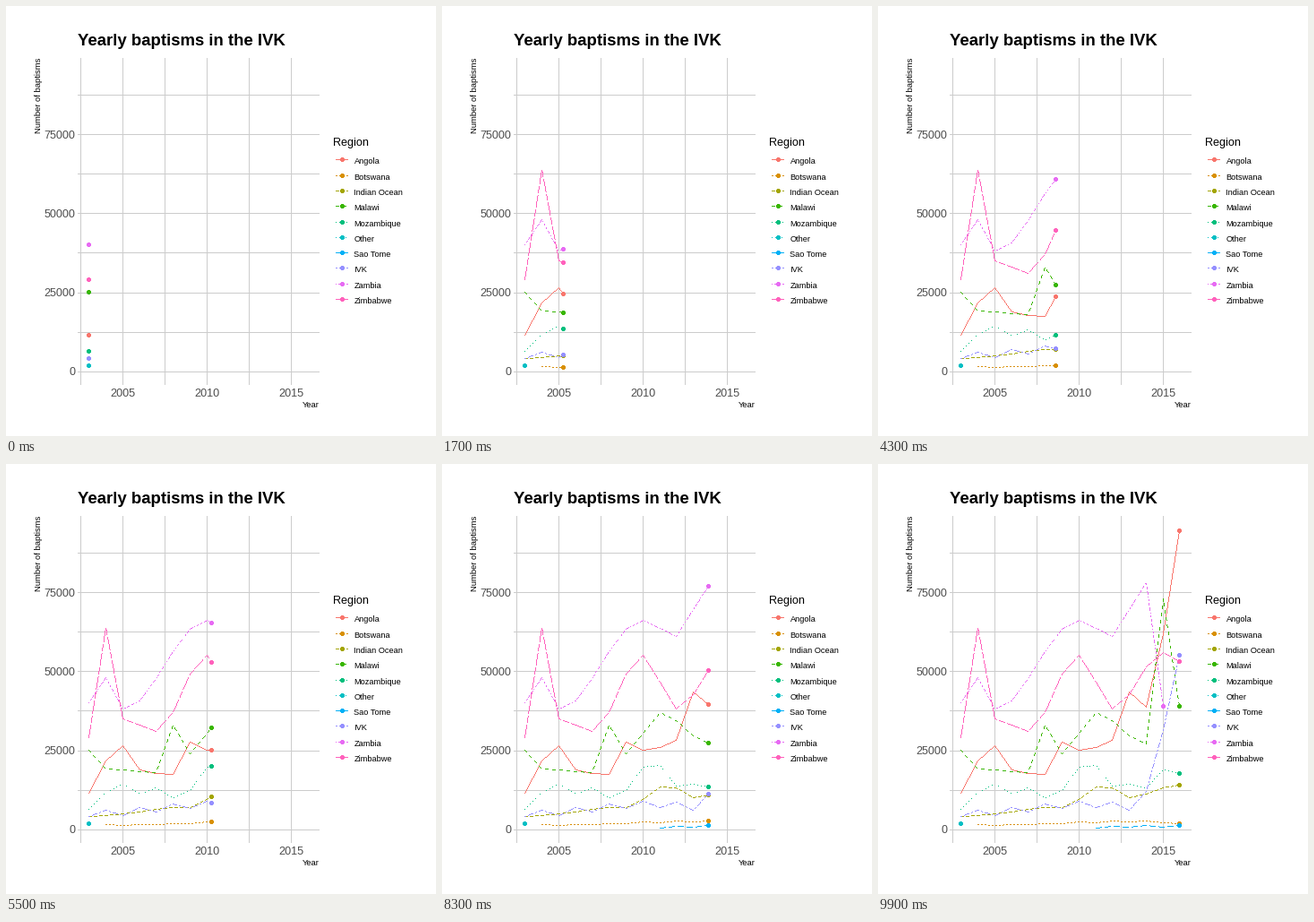
A matplotlib script for the animation above (10000 ms loop, 480 px wide and 480 px high).

```python
import numpy as np
import matplotlib.pyplot as plt
from matplotlib.animation import FuncAnimation

plt.rcParams["font.family"] = "Liberation Sans"

SIZE = 480
FRAMES = 100
FIRST, LAST = 2003, 2016
LEFT, RIGHT, TOP, BOTTOM = 80, 349, 57, 421
GRID, TICK = "#cccccc", "#4d4d4d"

# name, colour, dash pattern, yearly zigzag, turning points (years since FIRST, thousands)
REGIONS = [
    ("Angola", "#F8766D", (1,), 1.5,
     [(0, 10), (1.4, 26), (4.3, 16), (6.4, 27), (8.4, 24), (10, 42), (11.3, 40), (13, 96)]),
    ("Botswana", "#D89000", (2, 2), -0.15, [(1, 1.2), (11, 2.6), (13, 1.6)]),
    ("Indian Ocean", "#A3A500", (4, 2), 0,
     [(0, 4), (6, 7), (8.5, 14), (10, 10), (13, 14)]),
    ("Malawi", "#39B600", (4, 4), 0,
     [(0, 25), (1, 19), (4, 18), (5, 33), (6, 24), (8, 37), (11, 27), (12, 73), (13, 39)]),
    ("Mozambique", "#00BF7D", (1, 3), 1.3,
     [(0, 5), (1, 13), (6, 11), (7, 21), (10, 13), (13, 19)]),
    ("Other", "#00BFC4", (1, 3, 4, 3), 0, [(0, 1.7)]),
    ("Sao Tome", "#00B0F6", (7, 3), -0.25, [(8, 0.7), (13, 1)]),
    ("IVK", "#9590FF", (2, 2, 6, 2), -1, [(0, 5), (8, 8), (10, 7), (11, 11), (13, 54)]),
    ("Zambia", "#E76BF3", (1, 2, 2, 2, 3, 2, 4, 2), 0,
     [(0, 40), (1, 48), (2, 38), (7, 66), (9, 61), (11, 78), (12, 39)]),
    ("Zimbabwe", "#FF62BC", (15, 2, 8, 2), 0,
     [(0, 29), (1, 64), (2, 35), (4, 31), (7, 55), (9, 38), (12, 56), (13, 53)]),
]


def px(t):
    return 92.35 + 18.78 * np.asarray(t)


def py(value):
    return 407.2 - 3.526 * np.asarray(value)


def yearly(zigzag, keys):
    """Cosine-eased curve through the turning points, sampled once a year."""
    at, level = np.array(keys, float).T
    t = np.arange(at[0], at[-1] + 1)
    i = np.searchsorted(at, t, side="right") - 1
    j = np.minimum(i + 1, len(at) - 1)
    u = (t - at[i]) / np.where(j > i, at[j] - at[i], 1)
    ease = (1 - np.cos(np.pi * u)) / 2
    return t, level[i] + (level[j] - level[i]) * ease + zigzag * (-1) ** t


def trace(xs, ys, dash):
    """Pixels of a one-pixel dashed polyline without antialiasing."""
    xs, ys = np.rint(xs), np.rint(ys)
    edges = np.cumsum(dash)
    run, pixels = 0, [np.empty((2, 0))]
    for dx, dy, x, y in zip(np.diff(xs), np.diff(ys), xs, ys):
        steps = int(max(abs(dx), abs(dy), 1))
        u = np.arange(steps + 1) / steps
        length = np.hypot(dx, dy)
        phase = (run + u * length) % edges[-1]
        on = np.searchsorted(edges, phase, side="right") % 2 == 0
        pixels.append(np.rint([x + u * dx, y + u * dy])[:, on])
        run += length
    return np.hstack(pixels)


def disc(x, y):
    dx, dy = np.mgrid[-2:3, -2:3]
    inside = dx ** 2 + dy ** 2 < 6
    return np.rint(x) + dx[inside], np.rint(y) + dy[inside]


fig = plt.figure(figsize=(SIZE / 72, SIZE / 72), dpi=72, facecolor="white")
ax = fig.add_axes([0, 0, 1, 1])
ax.set_xlim(0, SIZE)
ax.set_ylim(SIZE - 1, -1)
ax.axis("off")


def dots(xy, color, z=2):
    return ax.plot(*xy, ",", color=color, zorder=z)[0]


def label(x, y, text, size, color="black", **kw):
    ax.text(x, y, text, size=size, color=color, va="baseline", **kw)


# grid and axis labels
for year in np.arange(2002.5, LAST, 2.5):
    x = np.rint(px(year - FIRST))
    ax.plot([x, x], [TOP, BOTTOM], color=GRID, lw=1, zorder=1)
    if year % 5 == 0:
        label(x + 0.5, 435, f"{year:.0f}", 12.6, TICK, ha="center")
for value in np.arange(0, 90, 12.5):
    y = np.floor(py(value))
    ax.plot([LEFT, RIGHT], [y, y], color=GRID, lw=1, zorder=1)
    if value % 25 == 0:
        label(77.5, y + 4.5, f"{value * 1000:.0f}", 12.5, TICK, ha="right")

label(80.5, 43.5, "Yearly baptisms in the IVK", 18.6, weight="bold")
label(350, 447.5, "Year", 9.4, ha="right")
ax.text(41, 56.5, "Number of baptisms", size=9.4, rotation=90, ha="right", va="top")

# legend
label(365.5, 155, "Region", 12.6)
for i, (name, color, dash, *_) in enumerate(REGIONS):
    y = 171.4 + 17.28 * i
    dots(trace([368, 381], [y, y], dash), color)
    dots(disc(374.6, y), color)
    label(388.5, y + 4, name, 9.2)

series = [yearly(zigzag, keys) for *_, zigzag, keys in REGIONS]
lines = [dots(([], []), region[1], 3) for region in REGIONS]
heads = [dots(([], []), region[1], 4) for region in REGIONS]

# each year lands on a whole frame
years = np.arange(LAST - FIRST + 1)
year_frames = np.rint(np.linspace(0, FRAMES - 1, len(years)))


def draw(frame):
    now = np.interp(frame, year_frames, years)
    for line, head, (t, values), region in zip(lines, heads, series, REGIONS):
        shown = now >= t[0]
        line.set_visible(shown)
        head.set_visible(shown)
        end = min(now, t[-1])
        past = t < end
        xs = px(np.append(t[past], end))
        ys = py(np.append(values[past], np.interp(end, t, values)))
        line.set_data(*trace(xs, ys, region[2]))
        head.set_data(*disc(xs[-1], ys[-1]))
    return lines + heads


anim = FuncAnimation(fig, draw, frames=FRAMES, interval=100,
                     init_func=lambda: draw(0), repeat=True, repeat_delay=0)
plt.show()
```
